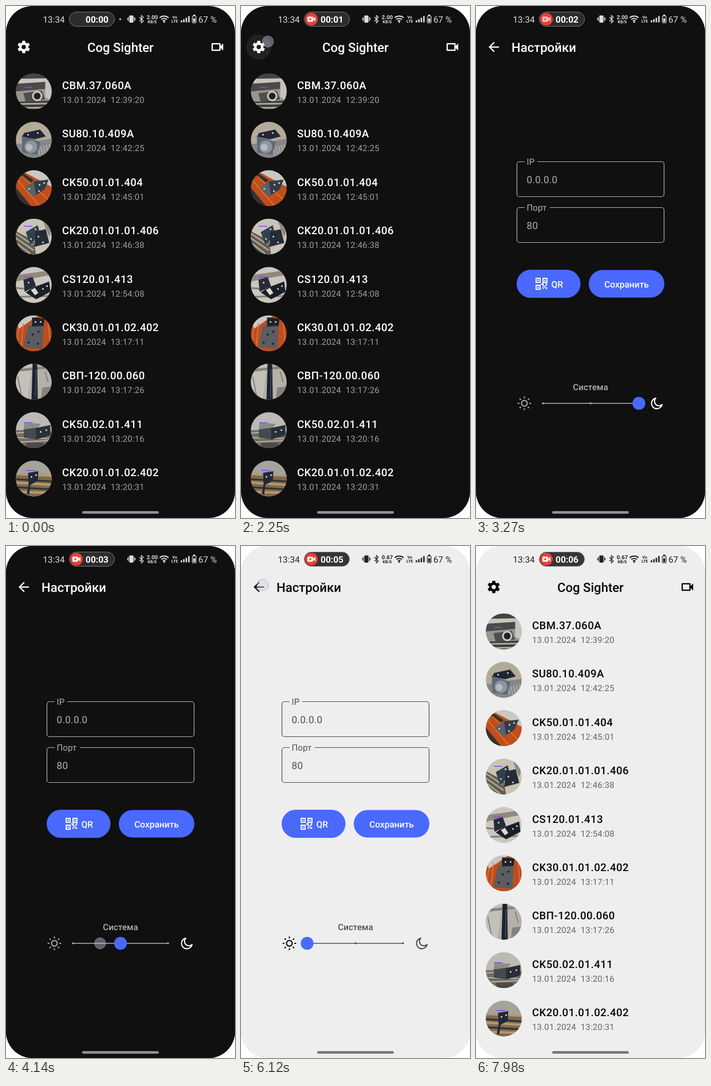
Animation, 400 px wide and 893 px high, one loop 8000 ms. Source, as an HTML page:

```html
<!DOCTYPE html>
<html lang="ru">
<head>
<meta charset="utf-8">
<title>Cog Sighter</title>
<style>
  html, body { margin: 0; width: 100%; height: 100%; overflow: hidden; background: #fff; }
  svg#stage {
    display: block; width: 100vw; height: 100vh;
    font-family: Roboto, sans-serif; text-rendering: geometricPrecision;
    --bg: #101011; --fg: #fff; --dim: #a0a0a0; --label: #b0b0b0; --status: #dedede;
    --pill: #2d2d2f; --pillEdge: #747474; --nav: #929292; --sun: #a8a8a8; --moon: #fff;
  }
  svg#stage.light {
    --bg: #eee; --fg: #060606; --dim: #636363; --label: #505050; --status: #222;
    --pill: #353535; --pillEdge: #8a8a8a; --nav: #777; --sun: #060606; --moon: #505050;
  }
  .bg { fill: var(--bg); }
  .fg { fill: var(--fg); }
  .name { font-size: 18.6px; font-weight: 500; letter-spacing: .48px; fill: var(--fg); }
  .date { font-size: 14.8px; letter-spacing: .26px; fill: var(--dim); white-space: pre; }
  .head { font-size: 22.1px; font-weight: 500; fill: var(--fg); }
  .mid { text-anchor: middle; }
  .label { font-size: 15.2px; fill: var(--label); }
  .value { font-size: 17.2px; letter-spacing: .25px; fill: var(--label); }
  .field { fill: none; stroke: var(--label); stroke-width: 1.2; }
  .button { fill: #4a69ff; }
  .caption { font-size: 15.5px; font-weight: 500; fill: #fff; }
  .holes { stroke: #d4d6d6; stroke-width: 3; stroke-linecap: round; }
  .mark { stroke: #8c42f0; stroke-width: 1.5; }
  #status { fill: var(--status); font-size: 15.3px; }
  .tiny { font-size: 7px; font-weight: 700; }
</style>
</head>
<body>
<svg id="stage" viewBox="0 0 400 893" preserveAspectRatio="none">
  <defs>
    <clipPath id="screen"><rect width="400" height="893" rx="46"/></clipPath>
    <clipPath id="round"><circle r="31.3"/></clipPath>

    <g id="photo0">
      <path fill="#99958d" d="M-32-32h64v64h-64z"/>
      <path fill="#454341" d="M-32-32h64v11h-64z"/>
      <path fill="#c9c5bc" d="M-32-22l64-1v6l-64 3z"/>
      <path fill="#4a4a4a" d="M-32-13l56-4 2 12-58 5z"/>
      <path fill="#c6c3bc" d="M20-18h12v34l-12-6z"/>
      <path fill="#3b3a39" d="M-32 18l64-2v16h-64z"/>
      <path stroke="#aaa69d" stroke-width="3" d="M-32 22l64-1M-32 29l64-1"/>
      <path fill="#4c4e50" d="M-18 3L14-1l6 15-34 5z"/>
      <circle cx="6" cy="8" r="9" fill="#d0cbc0"/><circle cx="6" cy="8" r="6" fill="#202226"/>
      <path class="mark" d="M-17-7h14"/>
    </g>
    <g id="photo1">
      <path fill="#b4aa9a" d="M-32-32h64v64h-64z"/>
      <path fill="#858789" d="M-32 8l64-10v34h-64z"/>
      <path stroke="#b2ada3" stroke-width="14" stroke-dasharray="2 3" d="M8 20l24-6"/>
      <path fill="#606976" d="M-21-8L12 4 6 26l-26-4z"/>
      <circle cx="-5" cy="12" r="11" fill="#8c95a2"/><circle cx="-8" cy="13" r="6" fill="#b9bbba"/>
      <path fill="#202632" d="M-20-6l3-6 28-6 10 12-19 5z"/>
      <path class="holes" d="M7-12h.1M-10-9h.1"/>
    </g>
    <g id="photo2">
      <path fill="#bf4e1c" d="M-32-32h64v64h-64z"/>
      <path fill="#c9c8c3" d="M-24-32h56v30L4-17z"/>
      <path fill="#35302e" d="M-32-2L-4 32h-28zM-24-30l24 16-5 4-24-16z"/>
      <path stroke="#e47931" stroke-width="1.5" d="M-30-16L10 31M-20-21L31 25"/>
      <path fill="#59616b" d="M-16 0L1-13 8 3l-7 13z"/>
      <path fill="#343c47" d="M0-12l26-3-7 17L4 12z"/>
      <path class="holes" d="M10-6h.1M18-9h.1M-8 1h.1M9 5h.1"/>
    </g>
    <g id="photo3">
      <path fill="#c9c3b5" d="M-32-32h64v64h-64z"/>
      <path fill="#645d54" d="M-32-10L0 7 4 32h-36z"/>
      <path stroke="#b5aa98" stroke-width="2.5" d="M-32-6L-2 14M-32 2L0 24M-32 10L-6 30M-32 19l16 12"/>
      <path fill="#8b8983" d="M14-32l18 15-5 18z"/>
      <path fill="#35404e" d="M-14-8L7-20l4 16-17 19z"/>
      <path fill="#252c38" d="M3-9l18-4 6 24-26 7z"/>
      <path class="holes" d="M8 0h.1M16 10h.1M3-13h.1M-5 4h.1"/>
      <path class="mark" d="M-17-18h14"/>
    </g>
    <g id="photo4">
      <path fill="#cac7bf" d="M-32-32h64v64h-64z"/>
      <path fill="#8f887d" d="M-32-17l64-9v8l-64 12z"/>
      <path stroke="#847e74" stroke-width="3" d="M-32 5l64 6M-32 21l64-2"/>
      <path fill="#262d38" d="M-18-9l16-5 6 16L-16 12z"/>
      <path fill="#191e27" d="M0 4L27-6l2 18L4 25l-18-12z"/>
      <path fill="#dad8d1" d="M-5 9L2 5l6 9-6 4z"/>
      <path class="holes" d="M16 7h.1M23 2h.1M-9-4h.1"/>
      <path class="mark" d="M-18-14h14"/>
    </g>
    <g id="photo5">
      <path fill="#bd4e1f" d="M-32-32h64v64h-64z"/>
      <path fill="#c8c7c4" d="M-32-32H9l-35 24z"/>
      <path stroke="#e0773b" stroke-width="1.5" d="M-26-9l-6 40M24-30l6 60M-18-18l-5 50"/>
      <path fill="#5a5d61" d="M-10-14L17-15l-2 42-33-3z"/>
      <path fill="#1c222b" d="M-3-28l22 2-2 13-20 1z"/>
      <path class="holes" d="M3-20h.1M12-20h.1"/>
      <path stroke="#24272c" stroke-width="4" stroke-linecap="round" d="M-9 16h.1M7 18h.1M-2 2h.1M8-3h.1"/>
    </g>
    <g id="photo6">
      <path fill="#b5b1a8" d="M-32-32h64v64h-64z"/>
      <path fill="#c3c0b8" d="M-32-32H-3l-8 64h-21z"/>
      <path fill="#85827a" d="M-32-22l64-6v4l-64 7zM15 10l17-2v24H12z"/>
      <path stroke="#77736b" stroke-width="1.5" d="M-28-9L-20 31M20-18l5 19"/>
      <path fill="#1b222d" d="M-2-32H6l1 64H-4z"/>
      <path fill="#414854" d="M3-22h2l-1 49H2z"/>
    </g>
    <g id="photo7">
      <path fill="#bcbab4" d="M-32-32h64v64h-64z"/>
      <path fill="#726b62" d="M-32 0h64v32h-64z"/>
      <path stroke="#b8b0a3" stroke-width="2" d="M-32 5l64-4M-32 13l64 2M-32 21l64-3"/>
      <path fill="#8b8c89" d="M-16-13L12-11 7-4l-25 4z"/>
      <path fill="#292f38" d="M-17-1L5-4l24-5v18L5 16l-22-3z"/>
      <path fill="#444a51" d="M-17-1L4-3v19l-20-3z"/>
      <path fill="#4b4a48" d="M-13 22h30l-2 10h-28z"/>
      <path class="holes" d="M12 3h.1M22 0h.1"/>
      <path class="mark" d="M-17-13h15"/>
    </g>
    <g id="photo8">
      <path fill="#a5a39c" d="M-32-32h64v64h-64z"/>
      <path fill="#7b6b55" d="M-32-7l64 3v36h-64z"/>
      <path stroke="#b9986a" stroke-width="4" d="M-32-8l64 3M-32 7l64 4M-32 23l64 2"/>
      <path stroke="#33302b" stroke-width="3" d="M-32 1l64 4M-32 15l64 4"/>
      <path fill="#202835" d="M-10-10L8-13l-1 17-13 7-2 17-4-2 3-17z"/>
      <path class="holes" d="M-4-3h.1M4-6h.1"/>
      <path class="mark" d="M-13-14H3"/>
    </g>
  </defs>

  <g clip-path="url(#screen)">
    <rect class="bg" width="400" height="893"/>

    <g id="list">
      <circle id="ripple" class="fg" cx="31" cy="71.5" r="22"/>
      <g transform="translate(31 71.5)" fill="none" stroke="var(--fg)">
        <circle r="6" stroke-width="4.4"/>
        <g id="teeth" stroke-width="5.4"></g>
      </g>
      <text class="head mid" x="200" y="79.5">Cog Sighter</text>
      <path class="fg" transform="translate(355.6 58) scale(1.13)"
        d="M15 8v8H5V8h10m1-2H4c-.55 0-1 .45-1 1v10c0 .55.45 1 1 1h12c.55 0 1-.45 1-1v-3.5l4 4v-11l-4 4V7c0-.55-.45-1-1-1z"/>
      <g id="rows"></g>
    </g>

    <g id="settings">
      <rect class="bg" x="-60" width="520" height="893"/>
      <path class="fg" transform="translate(17.5 58) scale(1.13)"
        d="M20 11H7.83l5.59-5.59L12 4l-8 8 8 8 1.41-1.41L7.83 13H20v-2z"/>
      <text class="head" x="62" y="79.5">Настройки</text>

      <rect class="field" x="71.5" y="271.5" width="257" height="61" rx="4.5"/>
      <rect class="bg" x="85" y="268" width="22" height="8"/>
      <text class="label" x="88.5" y="277">IP</text>
      <text class="value" x="88.5" y="309">0.0.0.0</text>
      <rect class="field" x="71.5" y="351.5" width="257" height="61" rx="4.5"/>
      <rect class="bg" x="85" y="348" width="44" height="8"/>
      <text class="label" x="88.5" y="357">Порт</text>
      <text class="value" x="88.5" y="389">80</text>

      <rect class="button" x="71" y="460" width="111.5" height="49" rx="24.5"/>
      <g transform="translate(104 474)" fill="none" stroke="#fff" stroke-width="1.9">
        <path d="M1 1h7v7H1zM13 1h7v7h-7zM1 13h7v7H1z"/>
        <path stroke-width="2.4" d="M3.3 4.5h2.4M15.3 4.5h2.4M3.3 16.5h2.4M12 13.2h2.4M16.8 13.2h2.4M14.4 15.6h2.4M12 18h2.4M16.8 18h3.6M9.8 10.8h4.6M18 10.8h2.4"/>
      </g>
      <text class="caption" x="131.5" y="490.5">QR</text>
      <rect class="button" x="197" y="460.5" width="132" height="48" rx="24"/>
      <text class="caption mid" x="263" y="490.5">Сохранить</text>

      <text class="label mid" x="200" y="670" font-weight="500">Система</text>
      <g transform="translate(84.5 693)" fill="none" stroke="var(--sun)" stroke-width="2.1">
        <circle r="5"/><g id="rays"></g>
      </g>
      <path stroke="var(--label)" stroke-width="1.3" d="M117 693H283"/>
      <g fill="var(--label)"><circle cx="117" cy="693" r="1.7"/><circle cx="200" cy="693" r="1.7"/><circle cx="283" cy="693" r="1.7"/></g>
      <circle id="thumb" class="button" cy="693" r="11.2"/>
      <path fill="none" stroke="var(--moon)" stroke-width="2.1" stroke-linejoin="round" d="M314 684a9.3 9.3 0 1 0 11 11a7.2 7.2 0 0 1-11-11z"/>
    </g>

    <g id="status">
      <text x="64.5" y="28.5">13:34</text>
      <rect x="110.5" y="10.5" width="79" height="25" rx="12.5" fill="var(--pill)" stroke="var(--pillEdge)"/>
      <g id="record">
        <circle cx="123" cy="23" r="11" fill="#ea4038"/>
        <g id="camera" fill="#fff">
          <rect x="116" y="18.5" width="10" height="9" rx="1.6"/><path d="M126 22l4-3v8l-4-3z"/>
          <circle cx="121" cy="23" r="1.8" fill="#ea4038"/>
        </g>
      </g>
      <text id="timer" x="139" y="28.5" font-size="15.5" font-weight="700" fill="#fff"></text>
      <circle id="hint" cx="199.5" cy="23" r="1.6"/>

      <rect x="215.5" y="16.5" width="7" height="12.5" rx="1"/>
      <path fill="none" stroke="var(--status)" stroke-width="1.2"
        d="M213.9 19v7.500M224.100 19v7.500M212.300 21v3.500M225.700 21v3.500M233 19.500l7 7-3.500 3V16.500l3.500 3-7 7"/>
      <text id="speed" class="mid" x="255.5" y="23" font-size="9.6" font-weight="700"></text>
      <text class="tiny mid" x="255.5" y="30">KB/S</text>
      <path fill="none" stroke="var(--status)" stroke-width="1.8"
        d="M268.5 20.5a11.5 11.5 0 0 1 15.5 0M271.3 23.5a7.4 7.4 0 0 1 9.9 0M274 26.2a3.6 3.6 0 0 1 4.5 0"/>
      <circle cx="276.3" cy="28" r="1.4"/>
      <text class="tiny mid" x="294.8" y="22">Vo</text>
      <text class="tiny mid" x="294.8" y="28.5">LTE</text>
      <path stroke="var(--status)" stroke-width="2.6" d="M306.4 28.5V25M310.7 28.5V23M315 28.5v-8M319.5 28.5v-11"/>
      <rect x="325.5" y="17.5" width="6.5" height="12" rx="1.5" fill="none" stroke="var(--status)" stroke-width="1.2"/>
      <path d="M327 15h3.5v2H327zM327 21.5h3.5V28H327z"/>
      <text x="336" y="28.5">67 %</text>
    </g>

    <circle id="touch" r="10" fill="#ccd0e6" fill-opacity=".42" stroke="#858cae" stroke-opacity=".55"/>
    <rect x="133" y="881" width="134" height="4.5" rx="2.25" fill="var(--nav)"/>
  </g>
</svg>
<script>
const LOOP = 8000;
const el = id => document.getElementById(id);
const set = (id, attrs) => {
  for (const key in attrs) el(id).setAttribute(key, attrs[key]);
};
const ramp = (t, start, length) => Math.min(1, Math.max(0, (t - start) / length));
const easeOut = p => 1 - (1 - p) ** 4;
const between = (t, a, b) => t >= a && t < b;

const parts = [
  ['CBM.37.060A', '12:39:20'], ['SU80.10.409A', '12:42:25'], ['CK50.01.01.404', '12:45:01'],
  ['CK20.01.01.01.406', '12:46:38'], ['CS120.01.413', '12:54:08'], ['CK30.01.01.02.402', '13:17:11'],
  ['СВП-120.00.060', '13:17:26'], ['CK50.02.01.411', '13:20:16'], ['CK20.01.01.02.402', '13:20:31']
];
el('rows').innerHTML = parts.map(([name, time], i) => `
  <g transform="translate(0 ${i * 84.4})">
    <g transform="translate(48.5 149)"><g clip-path="url(#round)"><use href="#photo${i}"/></g></g>
    <text class="name" x="98" y="145">${name}</text>
    <text class="date" x="98" y="169">13.01.2024  ${time}</text>
  </g>`).join('');

const spokes = (count, d) => Array.from({ length: count },
  (_, i) => `<path transform="rotate(${i * 360 / count})" d="${d}"/>`).join('');
el('rays').innerHTML = spokes(8, 'M0-8.7V-11.8');
el('teeth').innerHTML = spokes(6, 'M0-10.8V-7');

// Opening and closing share one slide-and-fade; the slide lasts longer than the fade.
const OPEN = 2370, CLOSE = 6240, SLIDE = 450, SHIFT = 40;
const DRAG = 3690, DRAG_TIME = 600;

function drawScreens(t) {
  const slid = easeOut(ramp(t, OPEN, SLIDE)) - easeOut(ramp(t, CLOSE, SLIDE));
  const shown = ramp(t, OPEN + 50, 83) - ramp(t, CLOSE + 35, 83);
  set('list', { transform: `translate(${-SHIFT * slid} 0)` });
  set('settings', {
    transform: `translate(${SHIFT * (1 - slid)} 0)`,
    opacity: shown,
    display: shown > 0 ? 'inline' : 'none'
  });
  set('ripple', { opacity: 0.07 * (ramp(t, 2100, 100) - ramp(t, 2320, 180)) });
}

function drawTouch(t) {
  const dragX = 284 - 169 * ramp(t, DRAG + 90, DRAG_TIME - 90);
  const spot = between(t, 2100, 2310) ? [47, 62]
    : between(t, DRAG, DRAG + DRAG_TIME + 60) ? [dragX, 693]
    : between(t, 6030, 6210) ? [38, 68] : null;
  set('touch', { display: spot ? 'inline' : 'none', cx: spot ? spot[0] : 0, cy: spot ? spot[1] : 0 });

  const stop = Math.round((dragX - 115) / 84.5);
  set('thumb', { cx: [115.5, 200, 284.5][stop] });
  el('stage').classList.toggle('light', stop === 0);
}

function drawStatus(t) {
  const seconds = Math.min(6, Math.max(0, Math.floor((t - 500) / 1070)));
  el('timer').textContent = '00:0' + seconds;
  el('speed').textContent = t < 4200 ? '2.00' : '0.67';
  set('hint', { opacity: 1 - ramp(t, 60, 150) });
  set('record', { opacity: ramp(t, 150, 300) });
  set('camera', { opacity: 0.78 + 0.22 * Math.cos((t - 1970) / 1940 * 2 * Math.PI) });
}

function frame() {
  const t = performance.now() % LOOP;
  drawScreens(t);
  drawTouch(t);
  drawStatus(t);
  requestAnimationFrame(frame);
}
frame();
</script>
</body>
</html>
```
